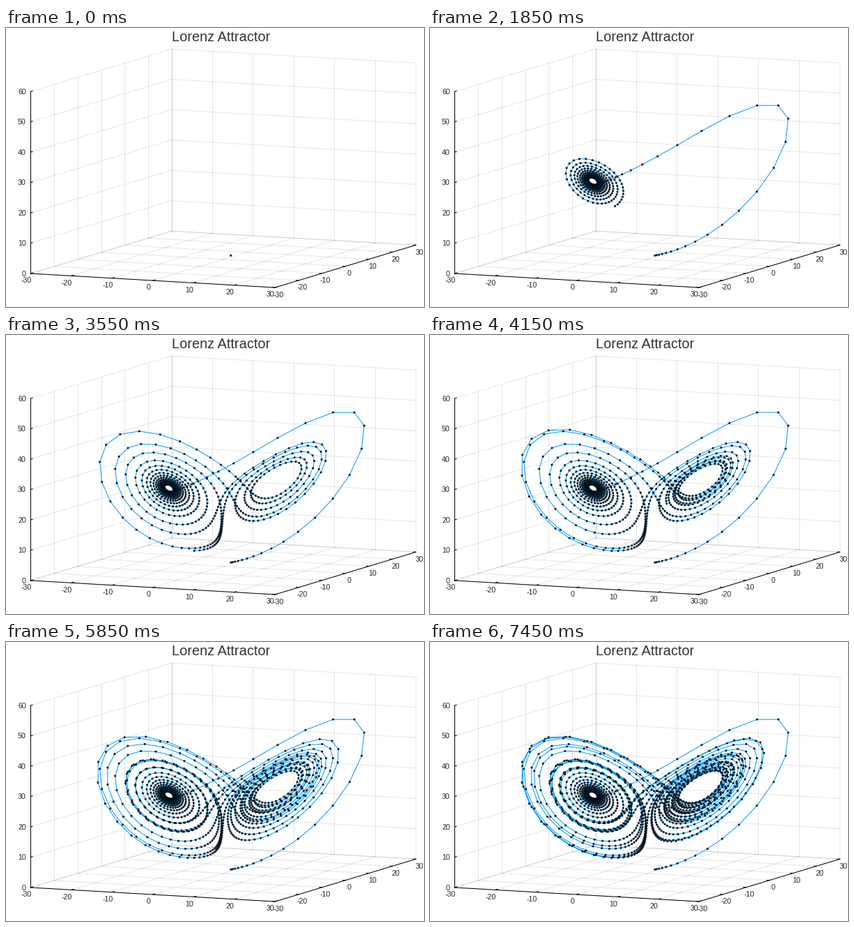
These frames come from a looping animation (600 by 400 pixels, 7500 ms). A matplotlib script:

```python
import matplotlib.pyplot as plt
import numpy as np
from matplotlib.animation import FuncAnimation
from matplotlib.collections import EllipseCollection

W, H, DPI = 600, 400, 100
PX = 72 / DPI  # points per pixel
FRAMES, INTERVAL, STRIDE = 150, 50, 10
LO, HI, TOP = -30, 30, 60

plt.rcParams["font.family"] = "Liberation Sans"
plt.rcParams["path.simplify"] = False


def lorenz(n, dt=0.02, sigma=10.0, rho=28.0, beta=8 / 3):
    """Semi-implicit Euler: each coordinate uses the ones already updated."""
    x = y = z = 1.0
    path = np.empty((n, 3))
    for i in range(n):
        x += dt * (sigma * (y - x))
        y += dt * (x * (rho - z) - y)
        z += dt * (x * y - beta * z)
        path[i] = x, y, z
    return path


ORIGIN = np.array([35.4, 352.0])
AXES = np.array([[350.7, 20.1], [202.2, -60.9], [0.0, -261.0]]) / 60


def project(p):
    return ORIGIN + (np.asarray(p, float) - [LO, LO, 0]) @ AXES


fig = plt.figure(figsize=(W / DPI, H / DPI), dpi=DPI, facecolor="white")
ax = fig.add_axes([0, 0, 1, 1])
ax.set_xlim(0, W)
ax.set_ylim(H, 0)
ax.axis("off")


def segment(a, b, **style):
    p = project([a, b])
    ax.plot(p[:, 0], p[:, 1], lw=PX, **style)


def label(x, y, text, size=10.67, ha="center", color="0.15"):
    ax.text(x, y, text, fontsize=size * PX, ha=ha, va="baseline", color=color)


grid = dict(color="black", alpha=0.1, zorder=1)
for t in range(LO, HI + 1, 10):
    h = t - LO
    segment((t, LO, 0), (t, HI, 0), **grid)
    segment((LO, t, 0), (HI, t, 0), **grid)
    segment((LO, t, 0), (LO, t, TOP), **grid)
    segment((t, HI, 0), (t, HI, TOP), **grid)
    segment((LO, LO, h), (LO, HI, h), **grid)
    segment((LO, HI, h), (HI, HI, h), **grid)

axis = dict(color="black", zorder=2)
segment((LO, LO, 0), (HI, LO, 0), **axis)
segment((HI, LO, 0), (HI, HI, 0), **axis)
segment((LO, LO, 0), (LO, LO, TOP), **axis)

for t in range(LO, HI + 1, 10):
    h = t - LO
    on_x, on_y, on_z = (t, LO, 0), (HI, t, 0), (LO, LO, h)
    segment(on_x, (t, LO + 1, 0), **axis)
    segment(on_y, (HI - 0.6, t, 0), **axis)
    segment(on_z, (LO, LO + 0.8, h), **axis)
    x, y = project(on_x)
    label(x - 6.5, y + 13.2, str(t))
    x, y = project(on_y)
    label(x + 5, y + 13.5, str(t))
    x, y = project(on_z)
    label(x - 6.6, y + 3.9, str(h), ha="right")

label(309, 19, "Lorenz Attractor", size=20, color="0.2")

points = project(lorenz(FRAMES * STRIDE))
trail, = ax.plot([], [], color="#009af9", lw=PX, zorder=3)
dots = EllipseCollection(
    [2, 2], [2, 2], [0, 0], units="xy", offsets=points[:1],
    offset_transform=ax.transData, facecolor="#009af9",
    edgecolor="black", linewidth=PX, zorder=4)
ax.add_collection(dots)


def draw(frame):
    shown = points[:frame * STRIDE + 1]
    trail.set_data(shown[:, 0], shown[:, 1])
    dots.set_offsets(shown)
    return trail, dots


anim = FuncAnimation(fig, draw, frames=FRAMES, interval=INTERVAL,
                     repeat=True, repeat_delay=0)
plt.show()
```
